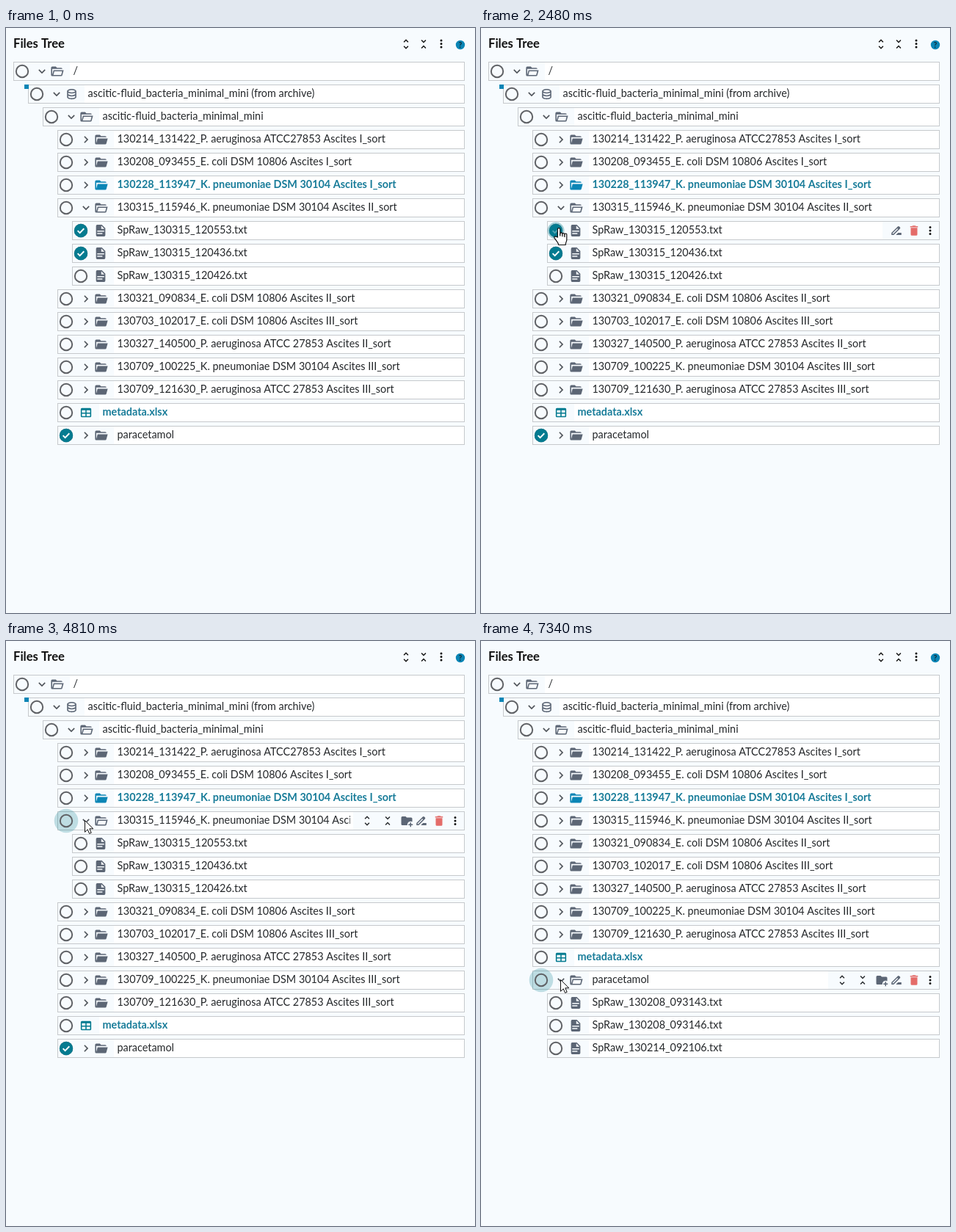
Write an HTML page with a canvas that moves like this. It is 639 px wide and 797 px high and loops after 8 s.

```html
<!DOCTYPE html>
<html lang="en">
<head>
<meta charset="utf-8">
<title>Files Tree</title>
<style>
html, body { margin: 0; width: 100%; height: 100%; overflow: hidden; background: #f7fbfe; }
canvas { display: block; width: 639px; height: 797px; }
</style>
</head>
<body>
<canvas id="stage" width="639" height="797"></canvas>
<script>
const ctx = document.getElementById('stage').getContext('2d');
const LOOP = 8000, RIGHT = 625, TOP = 46, STEP = 31, ROW_H = 26;
const BG = '#f7fbfe', LINE = '#c6c9cc', INK = '#25282b', SLATE = '#5c6675';
const TEAL = '#047b90', BLUE = '#0a85b5', LINK = '#187c99', RED = '#e46c69';
const FONT = 'Lato, "Open Sans", sans-serif';

// Icons on a 24 unit grid
const ICONS = {
  more: 'M12 5.83L15.17 9l1.41-1.41L12 3 7.41 7.59 8.83 9zm0 12.34L8.83 15l-1.41 1.41L12 21l4.59-4.59L15.17 15z',
  less: 'M7.41 18.59L8.83 20 12 16.83 15.17 20l1.41-1.41L12 14zm9.18-13.18L15.17 4 12 7.17 8.83 4 7.41 5.41 12 10z',
  dots: 'M10 6a2 2 0 1 0 4 0a2 2 0 1 0-4 0zm0 6a2 2 0 1 0 4 0a2 2 0 1 0-4 0zm0 6a2 2 0 1 0 4 0a2 2 0 1 0-4 0z',
  down: 'M16.59 8.59L12 13.17 7.41 8.59 6 10l6 6 6-6z',
  right: 'M10 6L8.59 7.41 13.17 12l-4.58 4.59L10 18l6-6z',
  folder: 'M19 20H4a2 2 0 0 1-2-2V6a2 2 0 0 1 2-2h6l2 2h7a2 2 0 0 1 2 2H4v10l2.14-8h17.07l-2.28 8.5A2 2 0 0 1 19 20z',
  open: 'M6.1 10L4 18V8h17a2 2 0 0 0-2-2h-7l-2-2H4a2 2 0 0 0-2 2v12a2 2 0 0 0 2 2h15a2 2 0 0 0 1.9-1.5L23.2 10zM19 18H6l1.6-6h13z',
  file: 'M13 9h5.5L13 3.5zM6 2h8l6 6v12a2 2 0 0 1-2 2H6a2 2 0 0 1-2-2V4a2 2 0 0 1 2-2m9 16v-2H6v2zm3-4v-2H6v2z',
  table: 'M5 4h14a2 2 0 0 1 2 2v12a2 2 0 0 1-2 2H5a2 2 0 0 1-2-2V6a2 2 0 0 1 2-2M5 8v4h6V8zm8 0v4h6V8zm-8 6v4h6v-4zm8 0v4h6v-4z',
  archive: 'M12 3C7.58 3 4 4.79 4 7v10c0 2.21 3.59 4 8 4s8-1.79 8-4V7c0-2.21-3.58-4-8-4m6 14c0 .5-2.13 2-6 2s-6-1.5-6-2v-2.23a16 16 0 0 0 12 0zm0-4.55a12 12 0 0 1-12 0V9.64a14 14 0 0 0 12 0zM12 9C8.13 9 6 7.5 6 7s2.13-2 6-2 6 1.5 6 2-2.13 2-6 2z',
  add: 'M13 19l.1 1H4a2 2 0 0 1-2-2V6a2 2 0 0 1 2-2h6l2 2h8a2 2 0 0 1 2 2v5.8A6 6 0 0 0 13 19m7-1v-3h-2v3h-3v2h3v3h2v-3h3v-2z',
  edit: 'M18.4 5.8l-1.2-1.2a2 2 0 0 0-2.8 0L3 15.96V20h4.04L18.4 8.6a2 2 0 0 0 0-2.8M6.2 18H5v-1.2l8.66-8.67 1.2 1.2zM11 20l4-4h6v4z',
  bin: 'M6 19a2 2 0 0 0 2 2h8a2 2 0 0 0 2-2V7H6zM19 4h-3.5l-1-1h-5l-1 1H5v2h14z'
};
for (const k in ICONS) ICONS[k] = new Path2D(ICONS[k]);

const ARROW = new Path2D('M.5 .5V16.3L4.2 12.8L6.6 18.4L9.2 17.3L6.8 11.8H11.8Z');
const HAND = new Path2D('M-1.6 12V1.3A1.7 1.7 0 0 1 1.8 1.3V7A1.6 1.6 0 0 1 4.9 7.4A1.6 1.6 0 0 1 7.9 8.1A1.5 1.5 0 0 1 10.8 9V15.5C10.8 18 9.2 19 9.2 22.5H-.2C-.5 19.5-3 17.6-5.8 13.4C-7 11.4-4.8 10.2-3.4 11.5Z');

const PARENT = '130315_115946_K. pneumoniae DSM 30104 Ascites II_sort';
const LAST = 'paracetamol';
const FILE_A = 'SpRaw_130315_120553.txt', FILE_B = 'SpRaw_130315_120436.txt', FILE_C = 'SpRaw_130315_120426.txt';

// Times at which each checkbox flips, and whether it starts checked
const CHECKS = {
  [FILE_A]: { on: true, flips: [2430, 3440, 4100] },
  [FILE_B]: { on: true, flips: [4100] },
  [FILE_C]: { on: false, flips: [3440, 4100] },
  [PARENT]: { on: false, flips: [3440, 4100] },
  [LAST]: { on: true, flips: [6620] }
};
const RIPPLES = [
  { name: FILE_A, at: 2430 },
  { name: PARENT, at: 3440 },
  { name: PARENT, at: 4100, until: 6620 },
  { name: LAST, at: 6620, until: LOOP }
];

const item = (name, depth, icon, color) => ({ name, depth, icon, color });
function tree(t) {
  const dir = name => item(name, 3, 'folder');
  const files = names => names.map(n => item(n, 4, 'file'));
  const shown = t < 4960, unfolded = t >= 7340;
  return [
    item('/', 0, 'open'),
    item('ascitic-fluid_bacteria_minimal_mini (from archive)', 1, 'archive'),
    item('ascitic-fluid_bacteria_minimal_mini', 2, 'open'),
    dir('130214_131422_P. aeruginosa ATCC27853 Ascites I_sort'),
    dir('130208_093455_E. coli DSM 10806 Ascites I_sort'),
    item('130228_113947_K. pneumoniae DSM 30104 Ascites I_sort', 3, 'folder', BLUE),
    item(PARENT, 3, shown ? 'open' : 'folder'),
    ...(shown ? files([FILE_A, FILE_B, FILE_C]) : []),
    dir('130321_090834_E. coli DSM 10806 Ascites II_sort'),
    dir('130703_102017_E. coli DSM 10806 Ascites III_sort'),
    dir('130327_140500_P. aeruginosa ATCC 27853 Ascites II_sort'),
    dir('130709_100225_K. pneumoniae DSM 30104 Ascites III_sort'),
    dir('130709_121630_P. aeruginosa ATCC 27853 Ascites III_sort'),
    item('metadata.xlsx', 3, 'table', TEAL),
    item(LAST, 3, unfolded ? 'open' : 'folder'),
    ...(unfolded ? files(['SpRaw_130208_093143.txt', 'SpRaw_130208_093146.txt', 'SpRaw_130214_092106.txt']) : [])
  ].map((r, i) => {
    const leaf = r.icon === 'file' || r.icon === 'table';
    const x = 10 + 20 * r.depth, y = TOP + STEP * i;
    return { ...r, leaf, x, y, cy: y + 13, iconX: x + (leaf ? 39 : 59.5), textX: x + (leaf ? 61 : 81) };
  });
}

const clamp = v => Math.max(0, Math.min(1, v));
const smooth = u => u * u * (3 - 2 * u);

// Pointer legs: start, end, from, to, optional bend
const LEGS = [
  [300, 400, [463, 753], [396, 635]],
  [610, 1410, [396, 635], [78, 297], [345, 500]],
  [1410, 1680, [78, 297], [88, 284]],
  [1830, 2130, [88, 284], [106, 273]],
  [2680, 3140, [106, 273], [83, 247]],
  [4350, 4660, [83, 247], [107, 244]],
  [5550, 5870, [107, 244], [111, 449]],
  [5870, 6220, [111, 449], [84, 473]],
  [6370, 6520, [84, 473], [84, 464]],
  [6850, 7140, [84, 464], [108, 461]]
];
function pointer(t) {
  if (t < 300) return null;
  const [a, b, p, q, m] = LEGS.filter(l => l[0] <= t).pop();
  const u = smooth(clamp((t - a) / (b - a))), v = 1 - u;
  return p.map((c, i) => m ? v * v * c + 2 * u * v * m[i] + u * u * q[i] : v * c + u * q[i]);
}

function hoveredRow(rows, pos) {
  return pos && rows.find(r => pos[0] > r.x && pos[0] < RIGHT && pos[1] > r.y + 3 && pos[1] < r.y + ROW_H - 2);
}

function icon(name, x, y, size, color) {
  ctx.save();
  ctx.translate(x - size / 2, y - size / 2);
  ctx.scale(size / 24, size / 24);
  ctx.fillStyle = color;
  ctx.fill(ICONS[name], 'evenodd');
  ctx.restore();
}

function disc(x, y, r, color) {
  ctx.fillStyle = color;
  ctx.beginPath();
  ctx.arc(x, y, r, 0, 7);
  ctx.fill();
}

function text(s, x, y, size, color, weight = 400) {
  ctx.font = `${weight} ${size}px ${FONT}`;
  ctx.fillStyle = color;
  ctx.fillText(s, x, y);
}

function ripple(row, t) {
  for (const { name, at, until } of RIPPLES) {
    if (name !== row.name || t < at || t >= (until || at + 400)) continue;
    const p = clamp((t - at) / 150);
    const fade = until ? 1 : 1 - clamp((t - at - 120) / 250);
    const alpha = (0.42 - 0.19 * p) * fade;
    disc(row.x + 12, row.cy, 9 + 7.3 * p, `rgba(4,123,140,${alpha})`);
  }
}

function checkbox(row, t) {
  const { on: initial, flips } = CHECKS[row.name] || { on: false, flips: [] };
  const past = flips.filter(f => f <= t);
  const on = initial !== (past.length % 2 === 1);
  const p = past.length ? clamp((t - past[past.length - 1]) / 150) : 1;
  const fill = on ? clamp(p * 4) : clamp(1.6 * (1 - p));
  const mark = on ? 1 : clamp(1 - 2 * p);
  const x = row.x + 12, y = row.cy;
  ctx.lineWidth = 2;
  ctx.strokeStyle = '#606266';
  ctx.beginPath();
  ctx.arc(x, y, 8.2, 0, 7);
  ctx.stroke();
  if (!fill) return;
  ctx.save();
  ctx.globalAlpha = fill;
  disc(x, y, 9.2, TEAL);
  ctx.globalAlpha = mark;
  ctx.strokeStyle = '#fff';
  ctx.lineWidth = 1.9;
  ctx.setLineDash([12.5 * (on ? 0.2 + 0.8 * p : 1), 20]);
  ctx.beginPath();
  ctx.moveTo(x - 4.4, y + 0.2);
  ctx.lineTo(x - 1.4, y + 3.2);
  ctx.lineTo(x + 4.6, y - 3.1);
  ctx.stroke();
  ctx.restore();
}

function tools(row) {
  const left = row.leaf ? 547 : 473;
  ctx.fillStyle = BG;
  ctx.fillRect(left, row.y + 1, RIGHT - left - 1, ROW_H - 2);
  if (!row.leaf) {
    icon('more', 492, row.cy, 18, INK);
    icon('less', 520, row.cy, 18, INK);
    icon('add', 546, row.cy, 18, SLATE);
  }
  icon('edit', 566, row.cy, 18, SLATE);
  icon('bin', 590, row.cy, 18, RED);
  icon('dots', 612, row.cy, 18, '#111');
}

function drawRow(row, t, hovered) {
  const { x, y, cy, textX } = row;
  ctx.fillStyle = BG;
  ctx.fillRect(x, y, RIGHT - x, ROW_H);
  ctx.fillStyle = '#fff';
  ctx.fillRect(textX - 4, y, RIGHT - textX + 4, ROW_H);
  ctx.save();
  ctx.beginPath();
  ctx.rect(textX, y, (hovered ? (row.leaf ? 543 : 469) : RIGHT - 2) - textX, ROW_H);
  ctx.clip();
  text(row.name, textX + 0.5, y + 17, 14.4, row.color ? LINK : INK, row.color ? 700 : 400);
  ctx.restore();
  if (hovered) tools(row);
  ctx.strokeStyle = LINE;
  ctx.lineWidth = 1;
  ctx.strokeRect(x + 0.5, y + 0.5, RIGHT - x - 1, ROW_H - 1);
  if (!row.leaf) icon(row.icon === 'folder' ? 'right' : 'down', x + 39, cy, 19, '#4d5258');
  icon(row.icon, row.iconX, cy, row.leaf || row.icon === 'archive' ? 19 : 19.5, row.color || SLATE);
  ripple(row, t);
  checkbox(row, t);
}

// The hint lags behind the pointer and lingers briefly
function hint(rows, t) {
  for (let lag = 50; lag <= 130; lag += 20) {
    const pos = pointer(t - lag), row = hoveredRow(rows, pos);
    if (!row || Math.abs(pos[0] - row.iconX) > 12) continue;
    const right = Math.round(row.iconX) + 11, top = row.cy + 21;
    ctx.save();
    ctx.shadowColor = 'rgba(0,0,0,.25)';
    ctx.shadowBlur = 3;
    ctx.fillStyle = '#fff';
    ctx.beginPath();
    ctx.roundRect(right - 186, top, 186, 29, 3);
    ctx.fill();
    ctx.restore();
    ctx.textAlign = 'right';
    text('Click here to drag the item', right - 7, top + 19, 14.4, '#6d7175');
    ctx.textAlign = 'left';
    return;
  }
}

function drawPointer(rows, pos) {
  if (!pos) return;
  const over = rows.some(r => Math.hypot(pos[0] - r.x - 12, pos[1] - r.cy) < 10);
  ctx.save();
  ctx.translate(Math.round(pos[0]), Math.round(pos[1]));
  ctx.fillStyle = '#fff';
  ctx.strokeStyle = '#111';
  ctx.lineWidth = over ? 1.2 : 1;
  ctx.fill(over ? HAND : ARROW);
  ctx.stroke(over ? HAND : ARROW);
  if (over) {
    ctx.beginPath();
    for (const [x, y] of [[1.8, 7], [4.9, 7.8], [7.9, 8.6]]) {
      ctx.moveTo(x, y);
      ctx.lineTo(x, y + 3.5);
    }
    ctx.stroke();
  }
  ctx.restore();
}

function header() {
  text('Files Tree', 10, 27, 16.6, '#111', 700);
  icon('more', 545, 22, 18, '#111');
  icon('less', 569, 22, 18, '#111');
  icon('dots', 593, 21.5, 18, '#111');
  disc(619, 23, 6.2, BLUE);
  ctx.textAlign = 'center';
  text('?', 619, 26.8, 10.5, '#0d2a38', 700);
  ctx.textAlign = 'left';
}

function draw(t) {
  const rows = tree(t), pos = pointer(t), hovered = hoveredRow(rows, pos);
  ctx.fillStyle = BG;
  ctx.fillRect(0, 0, 639, 797);
  header();
  for (const row of rows) drawRow(row, t, row === hovered);
  ctx.fillStyle = BLUE;
  ctx.fillRect(25, 77, 6, 6);
  hint(rows, t);
  drawPointer(rows, pos);
}

const start = performance.now();
function tick() {
  draw((performance.now() - start) % LOOP);
  requestAnimationFrame(tick);
}
tick();
</script>
</body>
</html>
```
